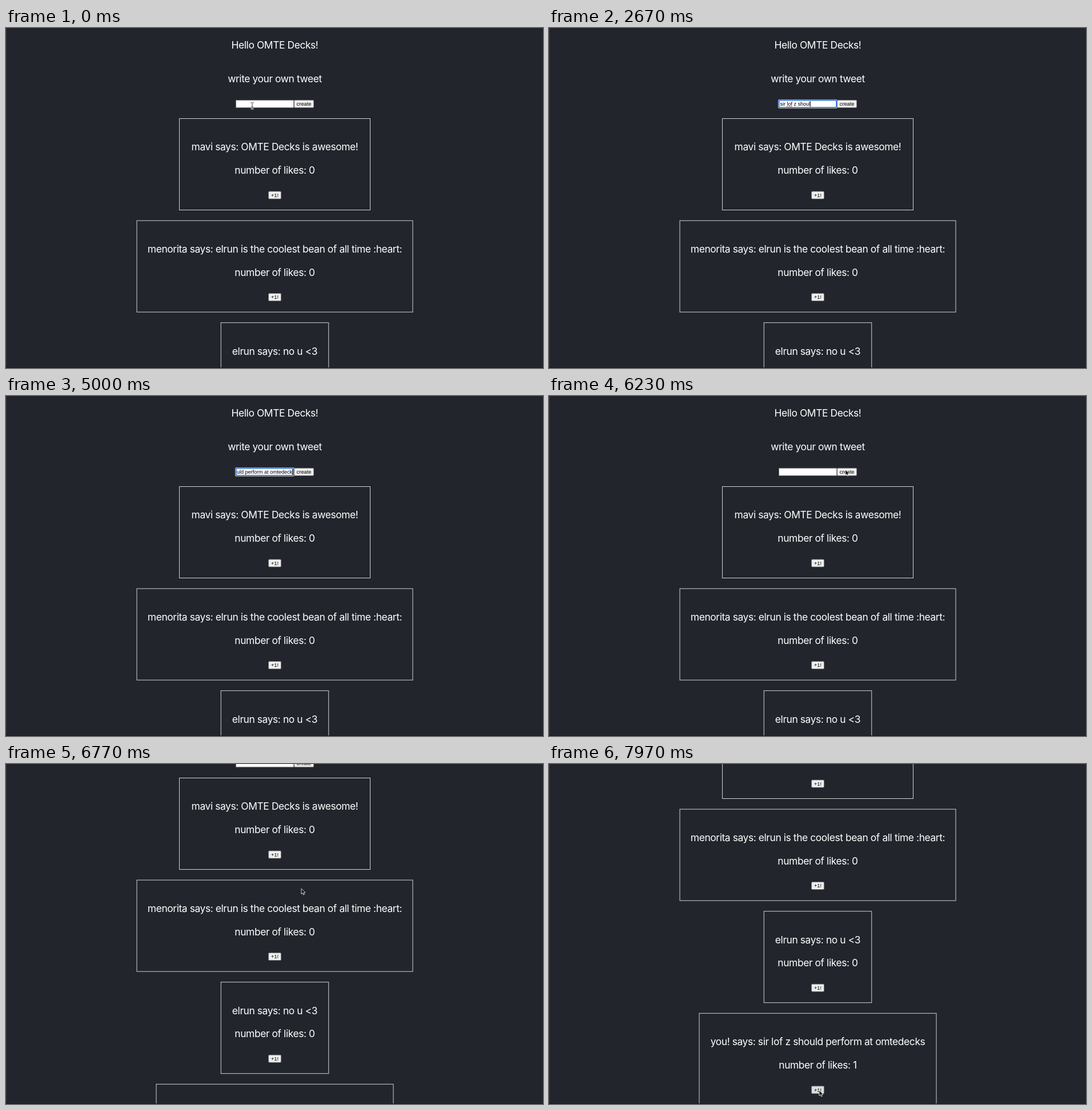
An HTML page for the animation above (8 s loop, 940x595 px).

```html
<!DOCTYPE html>
<html lang="en">
<head>
<meta charset="utf-8">
<title>Post feed</title>
<style>
  html, body { margin: 0; width: 100%; height: 100%; overflow: hidden; background: #22252c; }
  svg { display: block; }
  text { white-space: pre; }
  .big { font: 17.4px Inter, Roboto, sans-serif; letter-spacing: -.4px; fill: #fff; text-anchor: middle; }
  .label { font: 9.2px "Liberation Sans", Arial, sans-serif; text-anchor: middle; }
  .typed { font: 9px "Liberation Sans", Arial, sans-serif; }
  .button { fill: #efefef; stroke: #767676; stroke-width: .8; }
  .card { fill: none; stroke: #d2d3d5; }
</style>
</head>
<body>
<svg width="940" height="595" viewBox="0 0 940 595">
  <defs>
    <clipPath id="inner"><rect x="404" y="127" width="98.5" height="12"/></clipPath>
    <path id="beamShape" d="M-2.5-5.5H-1L0-4.5 1-5.5H2.5M0-4.5V4.5M-2.5 5.5H-1L0 4.5 1 5.5H2.5M-1.5 2H1.5"/>
  </defs>
  <path d="M.5 0V595" stroke="#30333a"/>
  <g id="page">
    <text class="big" x="470.5" y="36">Hello OMTE Decks!</text>
    <text class="big" x="470.5" y="95.3">write your own tweet</text>
    <rect x="402.5" y="126.3" width="101.2" height="13" fill="#fff" stroke="#767676" stroke-width=".9"/>
    <g id="focus">
      <rect x="401.2" y="125" width="103.4" height="15.4" rx="2" fill="#fff"/>
      <rect x="402.6" y="126.4" width="100.6" height="12.6" rx="1" fill="#fff" stroke="#1b62cd" stroke-width="1.6"/>
    </g>
    <g clip-path="url(#inner)">
      <g id="line">
        <text id="typed" class="typed" x="404.5" y="136"></text>
        <path id="spell" stroke="#f0303a" stroke-width="1.2" stroke-dasharray="1.4 1"/>
        <path id="caret" stroke="#000" stroke-width=".9"/>
      </g>
    </g>
  </g>
  <path d="M0 594.5H940" stroke="#17181e"/>
  <path id="arrow" d="M0 0V9.6L2.2 7.6 3.7 11 5.3 10.3 3.9 7H7z" fill="#111" stroke="#fff" stroke-width=".8"/>
  <g id="beam" fill="none">
    <use href="#beamShape" stroke="#fff" stroke-width="2"/>
    <use href="#beamShape" stroke="#222" stroke-width=".9"/>
  </g>
</svg>
<script>
const LOOP = 8000, TICK = 100 / 3;
const CENTER = 470.5, TOP = 158, PITCH = 178.6;
const FOCUS = 50, PRESS = 5870, RELEASE = 6030, TYPED = 5120;
const message = "sir lof z should perform at omtedecks";
const $ = id => document.getElementById(id);

function add(tag, attrs, content = "") {
  const el = document.createElementNS("http://www.w3.org/2000/svg", tag);
  for (const key in attrs) el.setAttribute(key, attrs[key]);
  el.textContent = content;
  return $("page").appendChild(el);
}

function addButton(center, y, width, label) {
  const box = add("rect", { class: "button", x: center - width / 2, y, width, height: 13, rx: 1.4 });
  add("text", { class: "label", x: center, y: y + 9.8 }, label);
  return box;
}

function addCard(row, width, text) {
  const y = TOP + PITCH * row;
  add("rect", { class: "card", x: CENTER - width / 2, y: y + .5, width, height: 160 });
  add("text", { class: "big", x: CENTER, y: y + 56.3 }, text);
  const likes = add("text", { class: "big", x: CENTER, y: y + 97 }, "number of likes: 0");
  return { likes, button: addButton(CENTER, y + 128, 21.8, "+1!") };
}

const createButton = addButton(521.6, 126.3, 34, "create");
addCard(0, 334, "mavi says: OMTE Decks is awesome!");
addCard(1, 483, "menorita says: elrun is the coolest bean of all time :heart:");
addCard(2, 188.5, "elrun says: no u <3");
const newCard = addCard(3, 415, "you! says: " + message);

// Key points: time, then values
const typing = [[1000, 1], [1630, 5], [2070, 10], [3700, 26], [TYPED, message.length]];
const scrolling = [[6490, 0], [7030, 258]];
const pointing = [
  [5370, 431, 136], [PRESS, 519, 129], [6230, 519, 129], [6430, 517, 218],
  [7070, 517, 218], [7330, 588, 449], [7830, 473, 571]
];

const linear = k => k;
const smooth = k => k * k * (3 - 2 * k);

function along(path, t, ease) {
  const next = path.findIndex(p => p[0] > t);
  if (next === 0) return path[0].slice(1);
  if (next < 0) return path[path.length - 1].slice(1);
  const a = path[next - 1], b = path[next];
  const k = ease((t - a[0]) / (b[0] - a[0]));
  return a.slice(1).map((v, i) => v + (b[i + 1] - v) * k);
}

const show = (el, on) => el.setAttribute("visibility", on ? "visible" : "hidden");
const move = (el, x, y) => el.setAttribute("transform", `translate(${x} ${y})`);

function drawInput(t) {
  const focused = t >= FOCUS && t < PRESS;
  const hasText = t >= typing[0][0] && t < RELEASE;
  const count = hasText ? Math.floor(along(typing, t, linear)[0]) : 0;
  const typed = $("typed");
  typed.textContent = message.slice(0, count);
  const widthOf = n => n ? typed.getSubStringLength(0, n) : 0;
  const end = 404.8 + widthOf(count);
  move($("line"), Math.min(0, 501.4 - end), 0);

  // The caret blinks only while no key is being typed
  const idle = t - (hasText ? TYPED : FOCUS);
  $("caret").setAttribute("d", `M${end} 128V138`);
  show($("caret"), focused && idle % 1000 < 510);
  show($("focus"), focused);

  const misspelt = count > 10;
  if (misspelt) $("spell").setAttribute("d", `M${404.5 + widthOf(4)} 137.6H${404.5 + widthOf(7)}`);
  show($("spell"), misspelt);
}

function drawMouse(t) {
  const [x, y] = along(pointing, t, smooth);
  const visible = t < typing[0][0] || t >= pointing[0][0];
  const beam = x < 504 && t < PRESS;
  show($("beam"), visible && beam);
  show($("arrow"), visible && !beam);
  move($("beam"), x, y);
  move($("arrow"), x, y);
}

function draw(t) {
  move($("page"), 0, -Math.round(along(scrolling, t, smooth)[0]));
  drawInput(t);
  drawMouse(t);
  createButton.style.fill = t >= PRESS && t < RELEASE ? "#d6d6d6" : "";
  newCard.button.style.fill = t >= 7850 ? "#dedede" : "";
  newCard.likes.textContent = "number of likes: " + (t >= 7960 ? 1 : 0);
}

const start = performance.now();
function frame() {
  const t = (performance.now() - start) % LOOP;
  // The screen refreshes 30 times a second
  draw(Math.floor((t + 5) / TICK) * TICK);
  requestAnimationFrame(frame);
}
frame();
</script>
</body>
</html>
```
